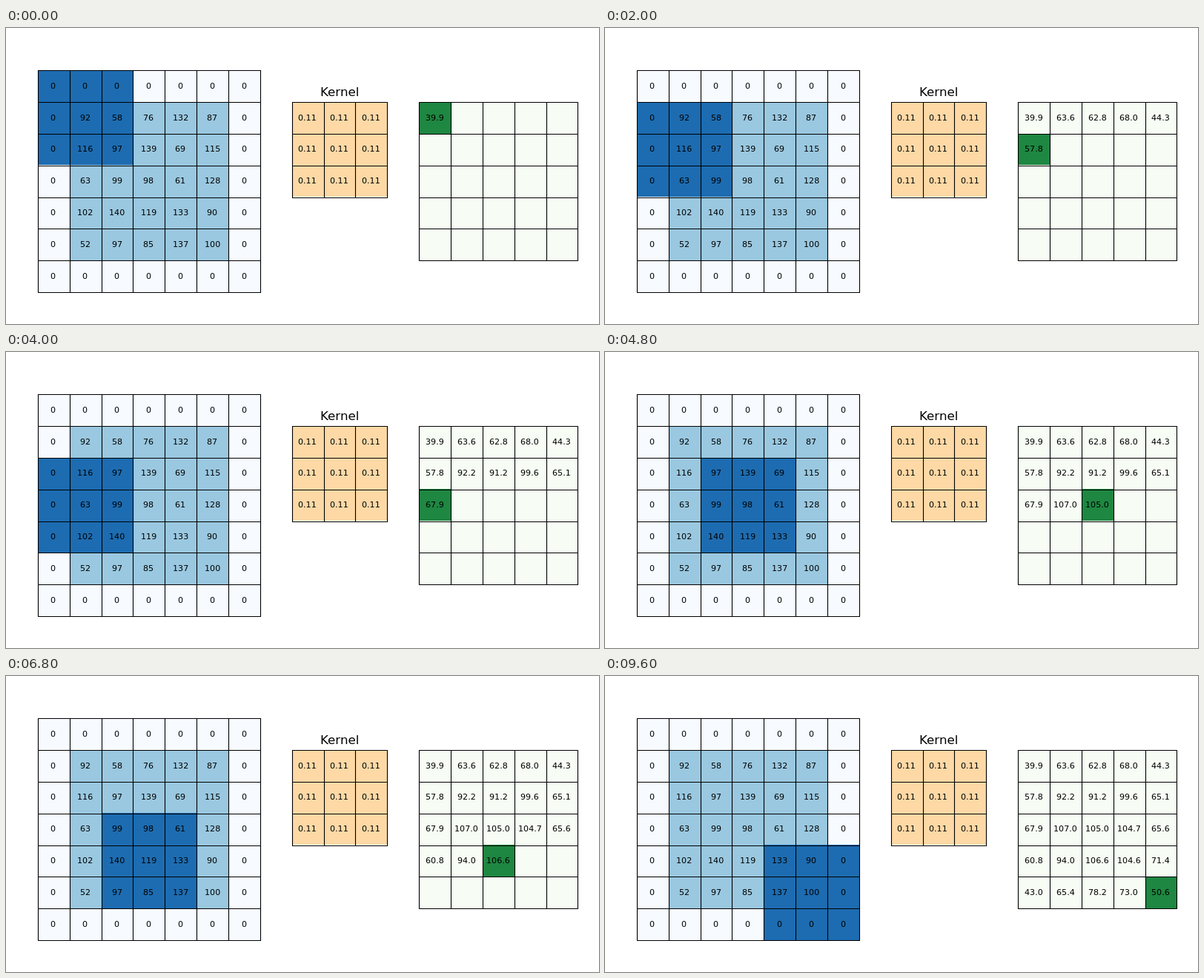
Recreate the animation shown at these times as an HTML page with a canvas. Size 800 by 400 pixels, loop 10000 ms.

```html
<!DOCTYPE html>
<html lang="en">
<head>
<meta charset="utf-8">
<title>Convolution</title>
<style>
  html, body { margin: 0; width: 100%; height: 100%; overflow: hidden; background: #fff; }
  canvas { display: block; }
</style>
</head>
<body>
<canvas id="stage" width="800" height="400"></canvas>
<script>
const ctx = document.getElementById('stage').getContext('2d');
const FONT = '"DejaVu Sans", sans-serif';
const CELL = 300 / 7;
const TOP = 400 / 7;
const STEP = 400;
const OUT = 5;

const values = [
  [92, 58, 76, 132, 87],
  [116, 97, 139, 69, 115],
  [63, 99, 98, 61, 128],
  [102, 140, 119, 133, 90],
  [52, 97, 85, 137, 100]
];

const padded = (r, c) => values[r - 1]?.[c - 1] ?? 0;

// Weighted sum with one decimal, ties rounded to even.
function convolve(r, c) {
  let sum = 0;
  for (let i = 0; i < 9; i++) sum += padded(r + Math.floor(i / 3), c + i % 3);
  const hundredths = sum * 11;
  let tenths = Math.round(hundredths / 10);
  if (hundredths % 10 === 5 && tenths % 2) tenths--;
  return (tenths / 10).toFixed(1);
}

function label(text, cx, baseline, size) {
  ctx.font = `${size}px ${FONT}`;
  ctx.fillStyle = '#000';
  const left = cx - ctx.measureText(text).width / 2;
  ctx.fillText(text, Math.round(left - 0.3), Math.round(baseline));
}

function grid(col, row, n, color, text) {
  const x = i => (col + i) * CELL;
  const y = i => TOP + (row + i) * CELL;
  const edgeX = i => Math.round(x(i));
  const edgeY = i => Math.round(y(i) - 0.3);

  const each = draw => {
    for (let r = 0; r < n; r++) for (let c = 0; c < n; c++) draw(r, c);
  };

  each((r, c) => {
    ctx.fillStyle = color(r, c);
    ctx.fillRect(edgeX(c), edgeY(r), edgeX(c + 1) - edgeX(c), edgeY(r + 1) - edgeY(r));
  });

  const line = i => [Math.round(x(i)) + 0.5, Math.round(y(i)) + 0.5];
  const [x0, y0] = line(0);
  const [x1, y1] = line(n);
  ctx.strokeStyle = '#000';
  ctx.lineWidth = 1.11;
  ctx.beginPath();
  ctx.rect(x0, y0, x1 - x0, y1 - y0);
  for (let i = 1; i < n; i++) {
    const [lx, ly] = line(i);
    ctx.moveTo(lx, y0);
    ctx.lineTo(lx, y1);
    ctx.moveTo(x0, ly);
    ctx.lineTo(x1, ly);
  }
  ctx.stroke();

  each((r, c) => label(text(r, c), x(c + 0.5), y(r + 0.5) + 3.1, 100 / 9));
}

function draw(step) {
  const row = Math.floor(step / OUT);
  const col = step % OUT;
  const inWindow = (r, c) => r >= row && r < row + 3 && c >= col && c < col + 3;
  const isPadding = (r, c) => r % 6 === 0 || c % 6 === 0;

  ctx.fillStyle = '#fff';
  ctx.fillRect(0, 0, 800, 400);

  grid(1, 0, 7,
    (r, c) => inWindow(r, c) ? '#1d6cb1' : isPadding(r, c) ? '#f7fbff' : '#9ac8e0',
    (r, c) => String(padded(r, c)));

  grid(9, 1, 3, () => '#fed9a6', () => '0.11');
  label('Kernel', 450, 92, 50 / 3);

  grid(13, 1, OUT,
    (r, c) => r === row && c === col ? '#1e8741' : '#f7fcf5',
    (r, c) => r * OUT + c <= step ? convolve(r, c) : '');
}

function tick() {
  draw(Math.floor(performance.now() / STEP) % (OUT * OUT));
  requestAnimationFrame(tick);
}
tick();
</script>
</body>
</html>
```
